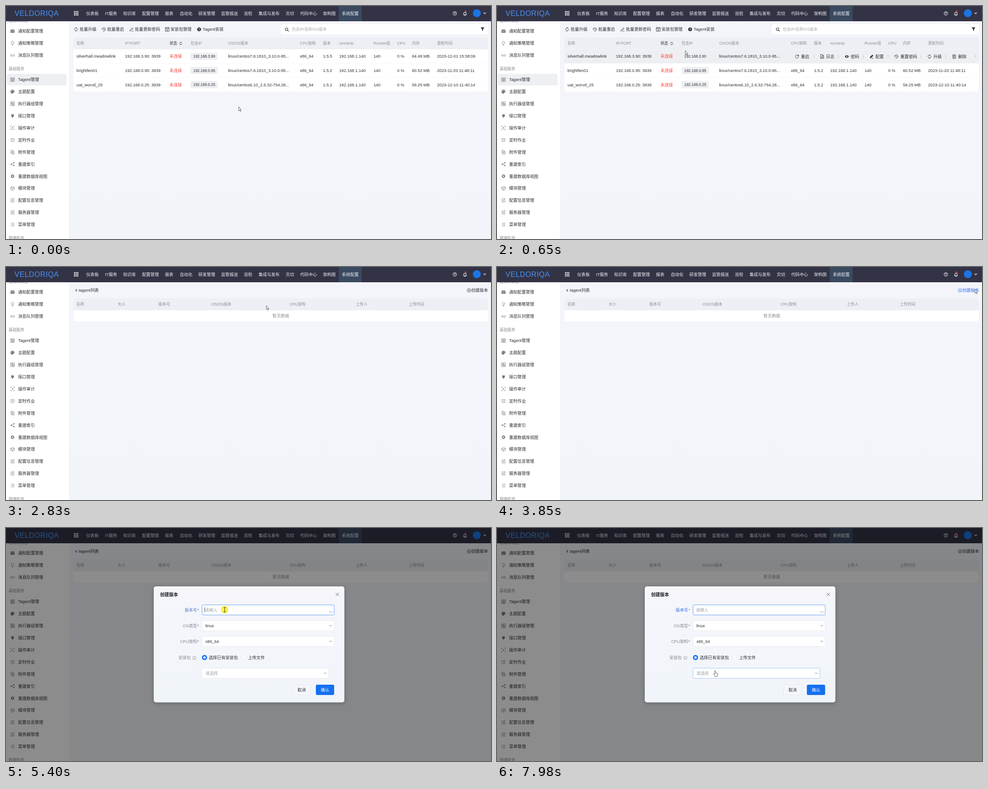
These frames come from a looping animation (1080x519 px, 8 s). An HTML page with a canvas:

```html
<!DOCTYPE html>
<html lang="zh">
<head>
<meta charset="utf-8">
<title>Tagent管理</title>
<style>
html, body { margin: 0; width: 100%; height: 100%; overflow: hidden; background: #f2f5f9; }
canvas { display: block; width: 1080px; height: 519px; }
</style>
</head>
<body>
<canvas id="stage"></canvas>
<script>
const W = 1080, H = 519, LOOP = 8000;
const canvas = document.getElementById('stage');
const ctx = canvas.getContext('2d');
const dpr = window.devicePixelRatio || 1;
canvas.width = W * dpr;
canvas.height = H * dpr;

const FONT = '"Liberation Sans", "Noto Sans CJK SC", "Noto Sans CJK", sans-serif';
const INK = '#2b2d33', MUTE = '#8b8e94', BLUE = '#2d6ff0', HOVER = '#eeeff3';

// Icons are centred on 0,0 in a box of about 9 units: s is stroked, f is filled.
const ring = (x, y, r) => `M${x - r} ${y}a${r} ${r} 0 1 0 ${2 * r} 0a${r} ${r} 0 1 0 ${-2 * r} 0z`;
const box = (x, y, w, h) => `M${x} ${y}h${w}v${h}h${-w}z`;
const teeth = n => Array.from({ length: n }, (_, i) => {
  const a = i * 2 * Math.PI / n, c = Math.cos(a), s = Math.sin(a);
  return `M${2.7 * c} ${2.7 * s}L${4.3 * c} ${4.3 * s}`;
}).join('');
const shapes = {
  mail: { f: box(-4.5, -3.5, 9, 7) + 'M-4.2 -2.7L0 .5L4.2 -2.7V-1.8L0 1.4L-4.2 -1.8z' },
  bulb: { s: 'M-1.3 2V1.2A3 3 0 1 1 1.3 1.2V2zM-1.2 3.4H1.2M-.6 4.4H.6' },
  link: { s: 'M-.8 -2H-2.3a2 2 0 0 0 0 4H-.8M.8 -2H2.3a2 2 0 0 1 0 4H.8M-2 0H2' },
  agent: { s: box(-4.2, -4.2, 8.4, 8.4) + 'M-4 -2.2H4' + box(-2, -.6, 4, 3.2) + 'M-2 1H2' },
  palette: { f: 'M0 -4.4a4.4 4.4 0 1 0 0 8.8c1.6 0 .6 -1.6 1.2 -2.2s3.2 .2 3.2 -2.2a4.4 4.4 0 0 0 -4.4 -4.4z' +
    ring(-2.5, 0, .7) + ring(-1.2, -2.3, .7) + ring(1.3, -2.3, .7) + ring(2.7, -.2, .7) },
  group: { s: box(-4.2, -4.2, 8.4, 8.4) + box(-2.5, -2.5, 3.2, 3.2) + box(-.6, -.6, 3.2, 3.2) },
  plug: { f: 'M-2 -4.5h1.1v2h1.8v-2h1.1v2h1v2.5a3 3 0 0 1 -2.3 2.6v2h-1.4v-2a3 3 0 0 1 -2.3 -2.6v-2.5h1z' },
  scan: { s: 'M-4 -1.8V-4H-1.8M1.8 -4H4V-1.8M4 1.8V4H1.8M-1.8 4H-4V1.8', f: ring(0, 0, 1.3) },
  alarm: { s: ring(0, .4, 3.7) + 'M0 -1.6V.7L1.5 1.5M-4.4 -2.6L-2.6 -4.2M4.4 -2.6L2.6 -4.2' },
  file: { s: 'M-3.4 -4.2H.8L3.4 -1.6V4.2H-3.4zM.8 -4.2V-1.6H3.4M-1.6 .3H1.6M-1.6 2.2H1.6' },
  clip: { s: 'M-3.4 3V-4.2H.6L2.6 -2.2M-1.6 -1.4H3.6V4.2H-1.6zM0 .6H2.2M0 2.4H2.2' },
  share: { s: 'M3 -3L-3 0L3 3', f: ring(3, -3, 1.4) + ring(-3, 0, 1.4) + ring(3, 3, 1.4) },
  gear: { s: teeth(8), f: ring(0, 0, 3.4) + ring(0, 0, 1.6) },
  cube: { s: 'M0 -4.3L4 -2.2V2.2L0 4.3L-4 2.2V-2.2zM-4 -2.2L0 0L4 -2.2M0 0V4.3' },
  sliders: { s: 'M-4.6 -3.2H4.6M-4.6 0H4.6M-4.6 3.2H4.6M2 -4.3V-2.1M-2 -1.1V1.1M1 2.1V4.3' },
  list: { s: 'M-2.4 -3H4.2M-2.4 0H4.2M-2.4 3H4.2M-4.2 -3H-3.3M-4.2 0H-3.3M-4.2 3H-3.3' },
  refresh: { s: 'M-3.3 1A3.4 3.4 0 0 1 1 -3.2M3.3 -1A3.4 3.4 0 0 1 -1 3.2', f: 'M.6 -4.6L2.8 -3L.6 -1.5zM-.6 4.6L-2.8 3L-.6 1.5z' },
  reload: { s: 'M3 -2A3.6 3.6 0 1 0 3.6 .6', f: 'M4 -4.2V-.8H.7z' },
  history: { s: 'M-3.4 -1.4A3.7 3.7 0 1 1 -2.6 2.6M0 -2V.3H2', f: 'M-5 -1.6L-1.9 -1.6L-3.6 .8z' },
  pen: { s: 'M-3.4 2.2L2 -3.4L3.6 -1.8L-1.8 3.4L-3.8 3.8zM.8 4.2H4.2' },
  solidPen: { f: 'M-4 3.6L-3.2 .8L1.8 -4L4 -1.8L-1.2 3zM0 3.2H4.2V4.2H-1z' },
  pack: { s: box(-4.2, -4.2, 8.4, 8.4) + 'M-4.2 -2H4.2M0 -.6V2.8M-1.6 1.3L0 2.8L1.6 1.3' },
  search: { s: ring(-.8, -.8, 2.9) + 'M1.4 1.4L4.2 4.2' },
  funnel: { f: 'M-4 -4H4.2L1.2 .2V4L-1 2.6V.2z' },
  eye: { f: 'M-4.6 0Q0 -6 4.6 0Q0 6 -4.6 0z' + ring(0, 0, 1.4) },
  trash: { s: 'M-4 -3H4M-1.2 -4.2H1.2M-3 -3V4.2H3V-3M-1 -1V2.4M1 -1V2.4' },
  version: { s: ring(0, 0, 4) + 'M-1.8 -1.4L0 2L1.8 -1.4' },
  bell: { s: 'M-3.6 2.6H3.6M-2.6 2.6V-.4A2.6 2.6 0 0 1 2.6 -.4V2.6M-1 4.2H1' },
  down: { s: 'M-2.6 -1.3L0 1.3L2.6 -1.3' },
  left: { s: 'M1.3 -2.6L-1.3 0L1.3 2.6' },
  right: { s: 'M-1.3 -2.6L1.3 0L-1.3 2.6' },
  close: { s: 'M-3.8 -3.8L3.8 3.8M3.8 -3.8L-3.8 3.8' },
  arrow: { f: 'M.4 .6V9.4L2.4 7.6L3.8 10.8L5 10.2L3.6 7.1H6.2z' },
  hand: { f: 'M-1.2 .9a1 1 0 0 1 2 0V4.6L4.6 5.3Q5.6 5.6 5.5 7L4.6 10V12.6H-1V10.8L-3.8 7.6Q-4 6.2 -2.6 6.6L-1.2 7.6z' }
};
for (const k in shapes) for (const m in shapes[k]) shapes[k][m] = new Path2D(shapes[k][m]);

function icon(name, x, y, color, width = 0.9, scale = 1) {
  const { s, f } = shapes[name];
  ctx.save();
  ctx.translate(x, y);
  ctx.scale(scale, scale);
  ctx.strokeStyle = ctx.fillStyle = color;
  ctx.lineWidth = width;
  if (f) ctx.fill(f, 'evenodd');
  if (s) ctx.stroke(s);
  ctx.restore();
}

function text(str, x, y, color = INK, size = 9.25, align = 'left', weight = 400) {
  ctx.font = `${weight} ${size}px ${FONT}`;
  ctx.textAlign = align;
  ctx.fillStyle = color;
  ctx.fillText(str, x, y + size * 0.36);
}

function rect(x, y, w, h, fill, r = 0, stroke) {
  ctx.beginPath();
  ctx.roundRect(x, y, w, h, r);
  ctx.fillStyle = fill;
  ctx.fill();
  if (stroke) {
    ctx.strokeStyle = stroke;
    ctx.lineWidth = 0.8;
    ctx.stroke();
  }
}

function disc(x, y, r, fill) {
  ctx.beginPath();
  ctx.arc(x, y, r, 0, 7);
  ctx.fillStyle = fill;
  ctx.fill();
}

function shade(y0, y1, a, b) {
  const g = ctx.createLinearGradient(0, y0, 0, y1);
  g.addColorStop(0, a);
  g.addColorStop(1, b);
  return g;
}

const bursts = [[330, 1130, 11], [2220, 2460, 4], [2600, 3370, 11], [3450, 3450, 1],
  [4230, 5000, 11], [6030, 6500, 7], [6730, 7520, 11], [7830, 7980, 3]];
const path = [[250, 518, 224], [650, 419, 99], [1130, 372, 53], [2140, 372, 53], [2460, 306, 64],
  [2520, 306, 64], [2900, 640, 90], [3220, 1060, 70], [3290, 1072, 53], [3370, 1066, 52],
  [3450, 1064, 49], [4150, 1064, 49], [4380, 860, 240], [4540, 640, 376], [4690, 345, 330],
  [4850, 420, 215], [5000, 487, 182], [5950, 487, 182], [6500, 487, 214], [6650, 487, 214],
  [7520, 487, 290], [7760, 487, 290], [7980, 486, 318]];
const clicks = [[1440, 1610], [3680, 3850], [5160, 5480]];

function pointer(t) {
  let q = 0;
  for (const [a, b, n] of bursts) {
    if (t < a) break;
    const step = (b - a) / (n - 1);
    q = t >= b ? b : a + Math.floor((t - a) / step + 1e-6) * step;
  }
  const i = path.findIndex(p => p[0] >= q);
  if (i < 1) return { x: path[0][1], y: path[0][2] };
  const [t0, x0, y0] = path[i - 1], [t1, x1, y1] = path[i];
  const k = (q - t0) / (t1 - t0);
  return { x: x0 + (x1 - x0) * k, y: y0 + (y1 - y0) * k };
}

let mouse, kind, modal;
const over = (x, y, w, h) => mouse.x >= x && mouse.x < x + w && mouse.y >= y && mouse.y < y + h;

function link(name, x, str, tx, y, end, w) {
  const hot = !modal && over(x - 5, y - 7, end - x + 5, 14);
  if (hot) kind = 'hand';
  icon(name, x, y, hot ? BLUE : INK, w);
  text(str, tx, y, hot ? BLUE : INK, 9.33);
}

const nav = [['仪表板', 178.5], ['IT服务', 220.5], ['知识库', 261], ['配置管理', 303], ['报表', 354],
  ['自动化', 387], ['研发管理', 428.5], ['监管报送', 479], ['巡检', 530], ['集成与发布', 562.5],
  ['灾切', 623], ['代码中心', 655], ['架构图', 706], ['系统配置', 748]];

function drawHeader() {
  rect(0, 0, W, 34, '#333346');
  rect(741, 0, 51, 34, '#3a4a60');
  ctx.letterSpacing = '0.6px';
  text('VELDORIQA', 19, 16, '#4a92f2', 16);
  ctx.letterSpacing = '0px';
  for (let i = 0; i < 9; i++) rect(151.5 + i % 3 * 3.6, 11.5 + Math.floor(i / 3) * 3.6, 2.4, 2.4, '#fff');
  for (const [s, x] of nav) text(s, x, 17, '#f2f3f6', 9.33);
  ctx.strokeStyle = '#fff';
  ctx.lineWidth = 1;
  ctx.beginPath();
  ctx.arc(999.5, 16.5, 4, 0, 7);
  ctx.stroke();
  text('?', 999.5, 16.5, '#fff', 7, 'center', 700);
  icon('bell', 1022, 17, '#fff', 1.1);
  disc(1023.5, 11.8, 1.9, '#f0433c');
  disc(1048.5, 16, 8.8, '#1c74e4');
  icon('down', 1066, 16, '#fff', 1.2);
}

const menu = [['mail', '通知配置管理'], ['bulb', '通知策略管理'], ['link', '消息队列管理'],
  ['agent', 'Tagent管理'], ['palette', '主题配置'], ['group', '执行器组管理'], ['plug', '接口管理'],
  ['scan', '操作审计'], ['alarm', '定时作业'], ['clip', '附件管理'], ['share', '重建索引'],
  ['gear', '重建数据库视图'], ['cube', '模块管理'], ['sliders', '配置信息管理'],
  ['sliders', '服务器管理'], ['list', '菜单管理']];

function drawSidebar(active) {
  rect(0, 34, 140, H - 34, '#fff');
  text('通知和消息', 6, 32.5, MUTE, 8.67);
  text('基础服务', 6, 140, MUTE, 8.67);
  text('健康检查', 6, 517, MUTE, 8.67);
  if (active) rect(2, 151, 133, 26, HOVER, 4);
  menu.forEach(([name, s], i) => {
    const y = i < 3 ? 56 + i * 27 : 164 + (i - 3) * 26.9;
    icon(name, 14.5, y, '#6f7278', 0.8);
    text(s, 27, y, INK, 9.3);
  });
}

function drawTable(bottom, heads) {
  rect(150, 70, 923, bottom - 70, '#fff', 5);
  rect(150, 70, 923, 26.5, '#edeff4', [5, 5, 0, 0]);
  for (const [s, x] of heads) text(s, x, 83, s === '状态' ? INK : MUTE, 8.6);
}

const agentHeads = [['名称', 157], ['IP:PORT', 265], ['状态', 364], ['包含IP', 411], ['OS/OS版本', 495],
  ['CPU架构', 654.5], ['版本', 706], ['runnerIp', 742], ['Runner组', 818.5], ['CPU', 871],
  ['内存', 904], ['更新时间', 960]];
const agents = [
  ['silverhall.meadowlink', '192.168.3.90', 'linux/centos7.6.1810_3.10.0-95...', '1.5.5', '64.49 MB', '2023-12-01 15:38:06'],
  ['brightfen01', '192.168.0.95', 'linux/centos7.6.1810_3.10.0-95...', '1.5.2', '60.52 MB', '2023-11-20 11:48:11'],
  ['uat_worvd_25', '192.168.0.25', 'linux/centos6.10_2.6.32-754.28...', '1.5.2', '59.25 MB', '2023-12-10 11:40:14']];
const actions = [['reload', 668, '重启'], ['file', 724, '日志'], ['eye', 779, '密码'], ['solidPen', 834, '配置'],
  ['history', 889.5, '重置密码'], ['refresh', 963, '升级'], ['trash', 1018, '删除']];
const dividers = [706, 760, 816, 870.5, 944.5, 999.5];

function drawAgents() {
  link('refresh', 156, '批量升级', 164, 52, 201);
  link('history', 218, '批量重启', 225.5, 52, 263);
  link('pen', 279.5, '批量更新密码', 287, 52, 342);
  link('pack', 359, '安装包管理', 366.5, 52, 413);
  disc(430, 52, 4.3, INK);
  text('?', 430, 52, '#fff', 7, 'center', 700);
  text('Tagent安装', 438, 52, INK, 9.33);
  rect(612, 40.5, 461, 22.5, '#fff', 4);
  icon('search', 625.5, 52.5, INK, 1.1);
  text('包含IP/名称/OS版本', 636.5, 52, '#a3a6ab', 8.67);
  icon('funnel', 1061, 51.5, INK);

  drawTable(191, agentHeads);
  icon('refresh', 389, 83.5, INK, 1, 0.8);
  agents.forEach(([name, ip, os, ver, mem, date], i) => {
    const top = 96.5 + i * 31.5, y = 112 + i * 31.6;
    const hot = over(150, top, 923, 31.5);
    if (hot) rect(150, top, 923, 31.5, HOVER, i === 2 ? [0, 0, 5, 5] : 0);
    else if (i < 2) rect(150, top + 31, 923, 0.6, '#f1f2f5');
    text(name, 157, y);
    text(ip + ': 3939', 265, y, INK, 9.2);
    text('未连接', 364, y, '#f5483b', 9.3);
    rect(411, y - 8, 60, 16, HOVER, 2);
    text(ip, 417, y, INK, 8.4);
    text(os, 494.5, y, INK, 9.2);
    if (hot) {
      for (const [ic, x, s] of actions) {
        icon(ic, x, y + 0.5, INK);
        text(s, x + 8.8, y + 0.5, INK, 9.3);
      }
      for (const x of dividers) rect(x - 0.4, y - 3.5, 0.8, 8, '#b9bcc2');
      icon('right', 1065, y, '#9a9da3', 0.8);
    } else {
      const cells = [['x86_64', 654.5], [ver, 706], ['192.168.1.140', 742], ['140', 818.5],
        ['0 %', 871], [mem, 904], [date, 960]];
      for (const [s, x] of cells) text(s, x, y, INK, 9.2);
    }
  });
}

const packHeads = [['名称', 157], ['大小', 248.5], ['版本号', 339.5], ['OS/OS版本', 457.5],
  ['CPU架构', 631.5], ['上传人', 779], ['上传时间', 897]];

function drawPackages() {
  icon('left', 156.5, 52, INK, 1.1);
  text('tagent列表', 162, 52, INK, 9.33);
  link('version', 1031, '创建版本', 1036, 52, 1074, 0.8);
  drawTable(121, packHeads);
  text('暂无数据', 612, 109, MUTE, 9.33, 'center');
}

function field(y, w, str, opts = {}) {
  const hot = over(436, y - 11.5, w, 23);
  if (hot) kind = opts.input ? 'beam' : 'hand';
  const edge = opts.focus || hot && opts.input ? '#3f86ee' : hot ? '#8fb6f2' : '#e3e7ee';
  rect(436.5, y - 11.3, w - 0.5, 22.6, '#fff', 3, edge);
  text(str, opts.input ? 443 : 444, y, opts.dark ? INK : '#9da0a6', 9.2);
  if (!opts.input) icon('down', 436 + w - 8, y, '#707379', 1);
}

function label(str, y, color = '#85888e') {
  text(str, 425.5, y, color, 9.2, 'right');
  text('*', 426.2, y, '#6d7076', 9);
}

function mix(a, b, k) {
  return `rgb(${a.map((v, i) => Math.round(v + (b[i] - v) * k))})`;
}

function drawDialog(t) {
  rect(0, 0, W, H, 'rgba(0,0,0,.45)');
  ctx.save();
  ctx.shadowColor = 'rgba(0,0,0,.28)';
  ctx.shadowBlur = 8 * dpr;
  ctx.shadowOffsetY = 2 * dpr;
  rect(329, 130, 424.5, 258.5, shade(130, 388, '#f6f6fb', '#f0f5fa'), 5);
  ctx.restore();
  text('创建版本', 343, 148, '#1f2126', 10, 'left', 700);
  icon('close', 738, 148, '#5d6066', 0.9);

  const focus = Math.min(1, Math.max(0, (t - 5160) / 390));
  label('版本号', 182.5, mix([133, 136, 142], [45, 111, 232], focus));
  field(182.5, 295, '请输入', { input: true, focus: focus > 0 });
  text('50', 728, 187, '#b4b7bc', 8, 'right');
  if (t >= 5330 && (t < 5400 || Math.floor((t - 5360) / 500) % 2 === 0)) rect(442, 177, 0.8, 11, '#333');
  label('OS类型', 217.5);
  field(217.5, 295, 'linux', { dark: true });
  label('CPU架构', 252.5);
  field(252.5, 295, 'x86_64', { dark: true });

  text('安装包', 384, 288.5, '#85888e', 9.2);
  ctx.strokeStyle = '#85888e';
  ctx.lineWidth = 0.8;
  ctx.beginPath();
  ctx.arc(419.5, 289.2, 3.7, 0, 7);
  ctx.stroke();
  text('i', 419.5, 289.2, '#85888e', 6.5, 'center');
  if (over(436, 282, 140, 14)) kind = 'hand';
  disc(442, 288.5, 5.8, '#1670f0');
  disc(442, 288.5, 2.7, '#fff');
  text('选择已有安装包', 451.5, 288.5, INK, 9.3);
  rect(524, 283, 11, 11, '#f7f9fc', 5.5, '#e3e8ef');
  text('上传文件', 539, 288.5, INK, 9.3);
  field(323.5, 283, '请选择');

  rect(638, 349.3, 40.5, 22.4, '#f4f6fa', 3, '#e1e4ea');
  text('取消', 658.3, 361, INK, 9.3, 'center');
  rect(690, 349, 40.7, 23, '#1670f0', 3);
  text('确认', 710.4, 361, '#fff', 9.3, 'center', 500);
}

function drawPointer(t) {
  const { x, y } = mouse;
  if (clicks.some(([a, b]) => t >= a && t < b)) disc(x - 0.3, y - 0.2, 8.4, 'rgba(255,238,40,.82)');
  if (kind === 'beam') {
    ctx.strokeStyle = '#333';
    ctx.lineWidth = 1;
    ctx.stroke(new Path2D(`M${x - 2.5} ${y - 5}h5m-2.5 0v10m-2.5 0h5`));
    return;
  }
  ctx.save();
  ctx.translate(x, y);
  ctx.lineJoin = 'round';
  ctx.lineWidth = 0.75;
  ctx.strokeStyle = '#33343a';
  ctx.fillStyle = '#fff';
  ctx.fill(shapes[kind].f);
  ctx.stroke(shapes[kind].f);
  ctx.restore();
}

function draw(t) {
  mouse = pointer(t);
  kind = 'arrow';
  modal = t >= 3920;
  ctx.setTransform(dpr, 0, 0, dpr, 0, 0);
  rect(0, 0, W, H, shade(34, H, '#f4f5fa', '#f1f5f9'));
  const listed = t < 1610;
  drawSidebar(listed);
  drawHeader();
  if (listed) drawAgents();
  else drawPackages();
  // The opening dialog already covers the link here.
  if (t >= 3850) kind = 'arrow';
  if (modal) drawDialog(t);
  drawPointer(t);
}

function tick() {
  draw(performance.now() % LOOP);
  requestAnimationFrame(tick);
}
tick();
</script>
</body>
</html>
```
